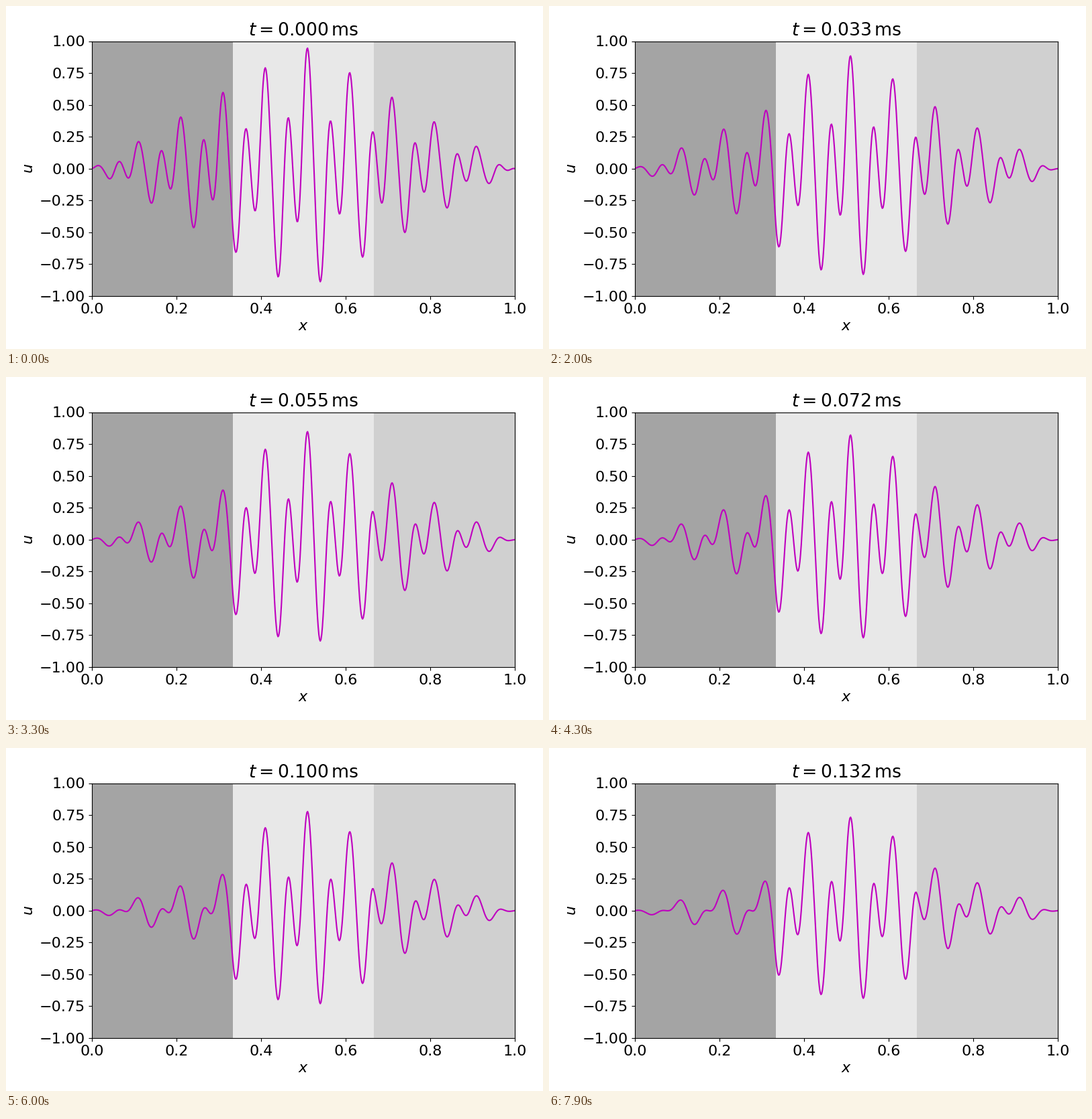
A matplotlib script for the animation above (8 s loop, 800 by 512 pixels).

```python
import numpy as np
import matplotlib.pyplot as plt
from matplotlib.animation import FuncAnimation

FRAMES, INTERVAL = 80, 100
DT = 1 / 600                                # ms per frame
EDGES = (0, 1 / 3, 2 / 3, 1)
DIFFUSIVITY = (7.0e-4, 1.683e-4, 3.6e-4)    # per ms
GREYS = ("#a4a4a4", "#e8e8e8", "#d0d0d0")

# Initial profile: a tent times a few harmonics
N = 600
x = np.linspace(0, 1, N + 1)
phi = 20 * np.pi * x
wave = (0.41 * np.cos(phi) + 0.667 * np.sin(2 * phi)
        + 0.052 * np.cos(3 * phi) + 0.025 * np.sin(4 * phi))
u0 = (1 - np.abs(2 * x - 1)) * wave

# Exact solution in time of u_t = D(x) u_xx with fixed ends
inner = x[1:-1]
root = np.sqrt(np.select([inner < EDGES[1], inner < EDGES[2]],
                         DIFFUSIVITY[:2], DIFFUSIVITY[2]))
lap = N**2 * (np.eye(N - 1, k=1) + np.eye(N - 1, k=-1) - 2 * np.eye(N - 1))
rates, modes = np.linalg.eigh(root[:, None] * lap * root)
coeffs = modes.T @ (u0[1:-1] / root)


def solve(t):
    u = np.zeros(N + 1)
    u[1:-1] = root * (modes @ (np.exp(rates * t) * coeffs))
    return u


plt.rcParams["font.size"] = 16
fig, ax = plt.subplots(figsize=(8, 5.12), dpi=100)
fig.subplots_adjust(left=128 / 800, right=758 / 800,
                    bottom=1 - 433 / 512, top=1 - 52.5 / 512)
for lo, hi, grey in zip(EDGES, EDGES[1:], GREYS):
    ax.axvspan(lo, hi, color=grey, lw=0)
line, = ax.plot(x, u0, color="m", lw=1.5)
ax.set(xlim=(0, 1), ylim=(-1, 1), xlabel="$x$", ylabel="$u$")
title = ax.set_title("")


def update(i):
    t = i * DT
    line.set_ydata(solve(t))
    title.set_text(rf"$t = {t:.3f}\,\mathrm{{ms}}$")
    return line, title


anim = FuncAnimation(fig, update, frames=FRAMES, interval=INTERVAL,
                     repeat=True, repeat_delay=0)
plt.show()
```
